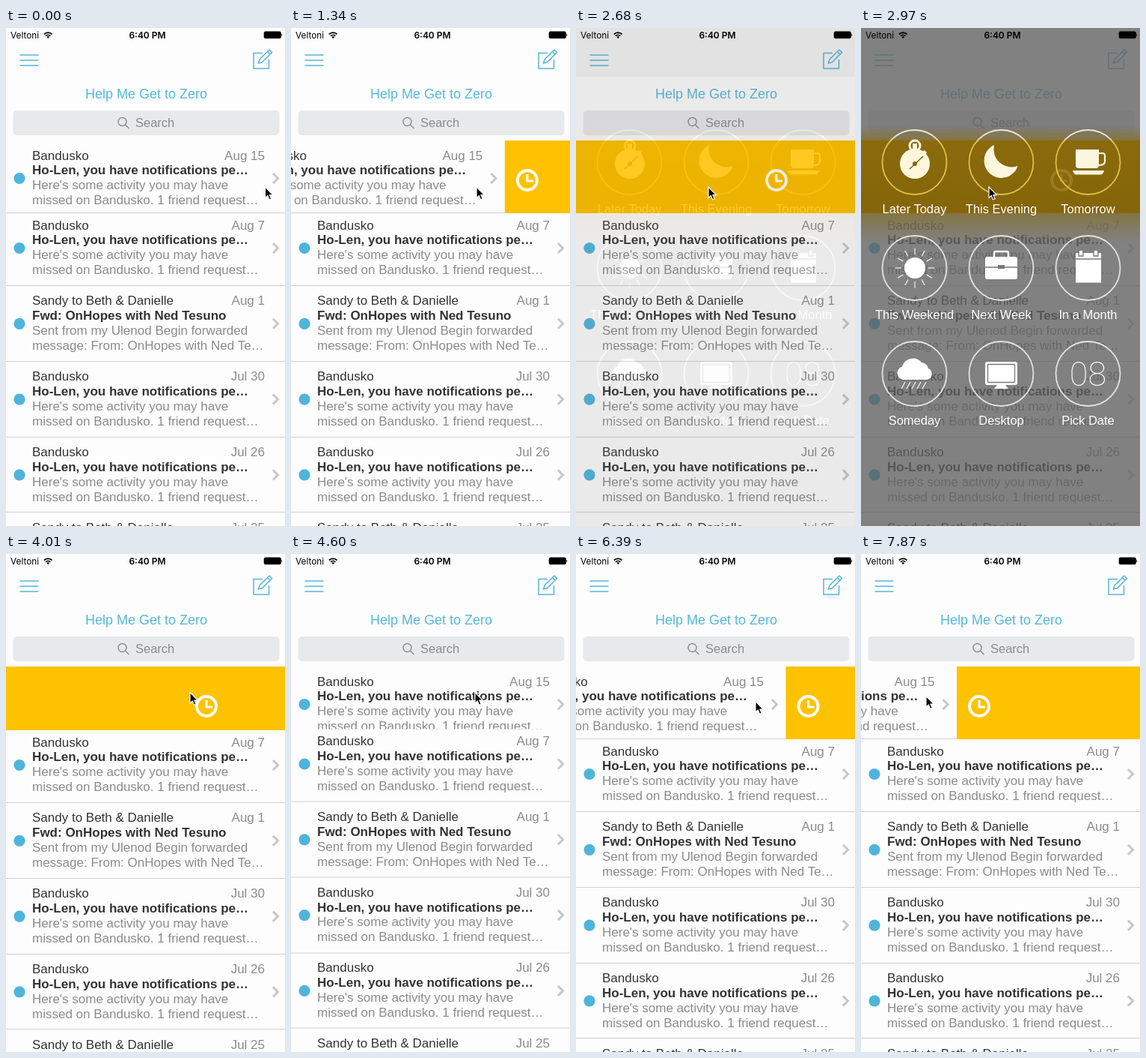
Animation of 373 by 664 pixels, one loop 8 s. Source, as an HTML page:

```html
<!DOCTYPE html>
<html lang="en">
<head>
<meta charset="utf-8">
<title>Swipe to snooze</title>
<style>
  html, body { margin: 0; width: 100%; height: 100%; overflow: hidden; background: #fdfdfd; }
  svg { display: block; width: 373px; height: 664px; font: 17px "Liberation Sans", Arial, sans-serif; }
  .paper { fill: #fdfdfd; }
  .name { fill: #333; }
  .title { fill: #333; font-weight: bold; }
  .body, .date { fill: #8b8b8d; }
  .date { text-anchor: end; }
  .rule { stroke: #cfcfd1; }
  .dot { fill: #4fb4dc; }
  .chev { fill: none; stroke: #c7c7cb; stroke-width: 3; }
  .line { fill: none; stroke: #55b5d8; stroke-width: 1.5; }
  .status { font: 11.8px Inter, sans-serif; }
  .label { fill: #fff; font-size: 16.5px; text-anchor: middle; }
  .ring { fill: none; stroke-width: 1.8; }
  .ink { fill: none; stroke: #777; stroke-width: 1.3; }
</style>
</head>
<body>
<svg viewBox="0 0 373 664">
  <defs>
    <linearGradient id="band" x1="0" x2="0" y1="130" y2="290" gradientUnits="userSpaceOnUse">
      <stop offset="0" stop-color="#8a6a0c" stop-opacity="0"/>
      <stop offset=".12" stop-color="#8a6a0c" stop-opacity=".55"/>
      <stop offset=".13" stop-color="#8a6a0c"/>
      <stop offset=".725" stop-color="#846509"/>
      <stop offset=".735" stop-color="#84702c" stop-opacity=".75"/>
      <stop offset="1" stop-color="#84784c" stop-opacity="0"/>
    </linearGradient>
    <linearGradient id="gold" x1="0" x2="0" y1="146" y2="154" gradientUnits="userSpaceOnUse">
      <stop offset="0" stop-color="#e6e4dc"/>
      <stop offset="1" stop-color="#e0bf45"/>
    </linearGradient>
    <g id="clock" fill="none" stroke-linejoin="round">
      <circle r="13" stroke-width="4"/>
      <path d="M0-8V1H8" stroke-width="3.2"/>
    </g>
  </defs>

  <rect class="paper" width="373" height="664"/>
  <rect id="under" y="150" width="373" height="97"/>
  <use id="icon" href="#clock" stroke="#fff"/>
  <g id="swipe"><rect class="paper" y="150" width="375.5" height="97"/></g>
  <g id="list"><rect class="paper" y="247" width="373" height="620"/></g>

  <g id="top">
    <rect class="paper" width="373" height="150"/>
    <rect id="bar" width="373" height="65"/>
    <path class="line" d="M18.500 36H43.500M18.500 43H43.500M18.500 50H43.500"/>
    <path class="line" d="M343 33.500H331V54H351.500V42M337.500 47L339 42 352 29 355.500 32.500 342.500 45.500ZM349.500 31.500L353 35"/>
    <text x="187.500" y="93.500" font-size="18" text-anchor="middle" fill="#55b8dc">Help Me Get to Zero</text>
    <rect x="9.500" y="110" width="356" height="33" rx="5" fill="#e8e9eb"/>
    <g fill="none" stroke="#8b8b90" stroke-width="1.400"><circle cx="155.500" cy="125" r="5.500"/><path d="M159.500 129L164.500 134"/></g>
    <text x="173" y="132" font-size="16.500" fill="#8b8b90">Search</text>
  </g>

  <g id="menu">
    <rect width="373" height="664" fill="#5f5f5f" opacity=".78"/>
    <rect y="130" width="373" height="160" fill="url(#band)"/>
    <use href="#clock" x="268" y="203" stroke="#a68a35" opacity=".6"/>
    <g id="choices"></g>
    <g fill="#fff6de">
      <circle cx="72" cy="181" r="20"/>
      <circle cx="72" cy="157" r="7" fill="none" stroke="#fff6de" stroke-width="3"/>
      <path d="M69 154H75V164H69ZM85 163L88 166 86 169 82 165Z"/>
      <path d="M65 188L83 171" stroke="#80650f" stroke-width="1.500"/>
      <circle cx="72" cy="181" r="3" fill="#80650f"/>
      <path d="M178 156A23 23 0 1 0 209.500 184A24 24 0 0 1 178 156Z"/>
      <path d="M287 162H318V183Q318 187 314 187H291Q287 187 287 183ZM283 190H325Q324 195.500 319 195.500H289Q284 195.500 283 190Z"/>
      <path d="M317 167H323Q326 167 326 170V178Q326 183 317 183" fill="none" stroke="#fff6de" stroke-width="2.200"/>
    </g>
    <g fill="#fff">
      <circle cx="72" cy="320" r="14"/>
      <g id="rays" stroke="#fff" stroke-width="1.100"></g>
      <rect x="166" y="305" width="43" height="30" rx="3"/>
      <path d="M178 306V300Q178 298 180 298H195Q197 298 197 300V306" fill="none" stroke="#fff" stroke-width="2.500"/>
      <path class="ink" d="M166 319H183M192 319H209"/>
      <rect x="183" y="316" width="9" height="5" fill="#777"/>
      <path d="M287 300H321V339.500H287ZM292 297H296V303H292ZM312 297H316V303H312Z"/>
      <path class="ink" d="M287 308H321M291 300V304H297V300M311 300V304H317V300"/>
      <path d="M56 469A9 9 0 0 1 55 451.500A15 15 0 0 1 81 446A10 10 0 0 1 90 454A8 8 0 0 1 89 469Z"/>
      <path d="M59 472L54 481M66 472L61 481M73 472L68 481M80 472L75 481M87 472L82 481" stroke="#fff" stroke-width="1.100"/>
      <rect x="166" y="445" width="43" height="31" rx="3"/>
      <rect class="ink" x="169.500" y="448.500" width="36" height="24" rx="1"/>
      <path d="M182 476H193L197 481H178Z"/>
      <text x="303.500" y="477" text-anchor="middle" style="font:200 45px Roboto, sans-serif">08</text>
    </g>
  </g>

  <g class="status">
    <text x="6" y="13.500">Veltoni</text>
    <text x="189" y="13.500" text-anchor="middle" font-weight="600" font-size="12">6:40 PM</text>
    <g fill="none" stroke="#000" stroke-width="1.700">
      <path d="M50.800 8.300A7.600 7.600 0 0 1 61.600 8.300M53 10.600A4.500 4.500 0 0 1 59.400 10.600"/>
    </g>
    <path d="M54.400 12A2.500 2.500 0 0 1 58 12L56.200 13.900Z"/>
    <rect x="345" y="4.800" width="22.500" height="9" rx="1.800" stroke="#000" stroke-width=".6"/>
    <path d="M368.300 7.500Q370.300 9.300 368.300 11Z"/>
  </g>

  <path id="cursor" d="M0 0V14.500L3.300 11.500 5.600 16.800 8.200 15.700 5.900 10.600H10.400Z" stroke="#fff" stroke-width="1.200"/>
</svg>

<script>
const $ = id => document.getElementById(id);
const add = (id, html) => $(id).insertAdjacentHTML("beforeend", html);

const social = ["Bandusko", "Ho-Len, you have notifications pe…",
  "Here's some activity you may have", "missed on Bandusko. 1 friend request…"];
const forward = ["Sandy to Beth & Danielle", "Fwd: OnHopes with Ned Tesuno",
  "Sent from my Ulenod Begin forwarded", "message: From: OnHopes with Ned Te…"];

function mail(lines, date, y, rule) {
  const classes = ["name", "title", "body", "body"];
  const text = lines.map((s, i) =>
    `<text class="${classes[i]}" x="35" y="${y + 19.9 * i}">${s.replace("&", "&amp;")}</text>`).join("");
  return `${text}<text class="date" x="346" y="${y}">${date}</text>
    <circle class="dot" cx="18" cy="${y + 25}" r="7.6"/>
    <path class="chev" d="M357 ${y + 18.5}L363.500 ${y + 25}L357 ${y + 31.5}"/>
    <path class="rule" d="M0 ${rule}H375.500"/>`;
}

add("swipe", mail(social, "Aug 15", 175.5, 246.5));
[[social, "Aug 7"], [forward, "Aug 1"], [social, "Jul 30"],
 [social, "Jul 26"], [forward, "Jul 25"], [social, "Jul 23"]].forEach(([lines, date], i) => {
  const y = 268.5 + 100.8 * i;
  add("list", mail(lines, date, y, Math.round(y + 74.5) + 0.5));
});

["Later Today", "This Evening", "Tomorrow", "This Weekend", "Next Week",
 "In a Month", "Someday", "Desktop", "Pick Date"].forEach((label, i) => {
  const x = 71.5 + 116 * (i % 3), y = 179 + 141 * Math.floor(i / 3);
  add("choices", `<circle class="ring" cx="${x}" cy="${y}" r="43" stroke="${i < 3 ? "url(#gold)" : "#e2e2e2"}"/>
    <text class="label" x="${x}" y="${y + 68}">${label}</text>`);
});
for (let a = 0; a < 360; a += 30)
  add("rays", `<path d="M18 0H26.500" transform="translate(72 320) rotate(${a})"/>`);

// Tracks of [step, value]; linear between keys.
const LOOP = 8000, START = 297, STEP = 148.3;
const tracks = {
  row: [[-1, 0], [0, -6], [5, -66], [6, -66], [9, -137], [12, -137], [13, -150], [14, -213],
    [15, -320], [16, -376], [27, -376], [28, 0], [36, 0], [37, -5], [41, -95], [44, -178], [51, -247.5]],
  x: [[-1, 346.5], [0, 337], [5, 272], [6, 272], [9, 200], [11, 195], [14, 183], [18, 171], [21, 246],
    [31, 246], [32, 310], [33, 345], [36, 345], [37, 333], [41, 240], [44, 162], [51, 87]],
  y: [[18, 212], [21, 184.5], [31, 184.5], [33, 188.5], [34, 188.5], [35, 191.5], [41, 196.5], [51, 189.5]],
  shift: [[24, 0], [25, -12], [26, -60], [27, -97], [28, -60], [29, -13.5], [30, 0]],
  menu: [[15, 0], [16, 0.15], [17, 0.6], [18, 1], [21, 1], [22, 0.5], [23, 0]]
};

function at(keys, k) {
  const i = keys.findIndex(key => key[0] >= k);
  if (i < 0) return keys[keys.length - 1][1];
  if (i === 0) return keys[0][1];
  const [k0, v0] = keys[i - 1], [k1, v1] = keys[i];
  return v0 + (v1 - v0) * (k - k0) / (k1 - k0);
}

const move = (id, x, y) => $(id).setAttribute("transform", `translate(${x} ${y})`);

function draw(now) {
  const k = Math.floor((now % LOOP - START) / STEP);
  const row = at(tracks.row, k);
  const edge = 375.5 + row;
  // The icon follows the row edge until the row is let go.
  const iconX = Math.min(346, Math.max(edge + 30, k < 28 ? 268 : 0));
  move("swipe", row, 0);
  move("icon", iconX, 203);
  $("icon").setAttribute("opacity", Math.min(1, -row / 60));
  $("under").setAttribute("fill", row < -58 ? "#ffc200" : "#dedede");
  move("list", 0, at(tracks.shift, k));
  $("bar").setAttribute("fill", k > 12 && k < 18 ? "#f4f4f4" : "#fdfdfd");
  $("menu").setAttribute("opacity", at(tracks.menu, k));
  move("cursor", at(tracks.x, k), at(tracks.y, k));
  requestAnimationFrame(() => draw(performance.now() - t0));
}
const t0 = performance.now();
draw(0);
</script>
</body>
</html>
```
